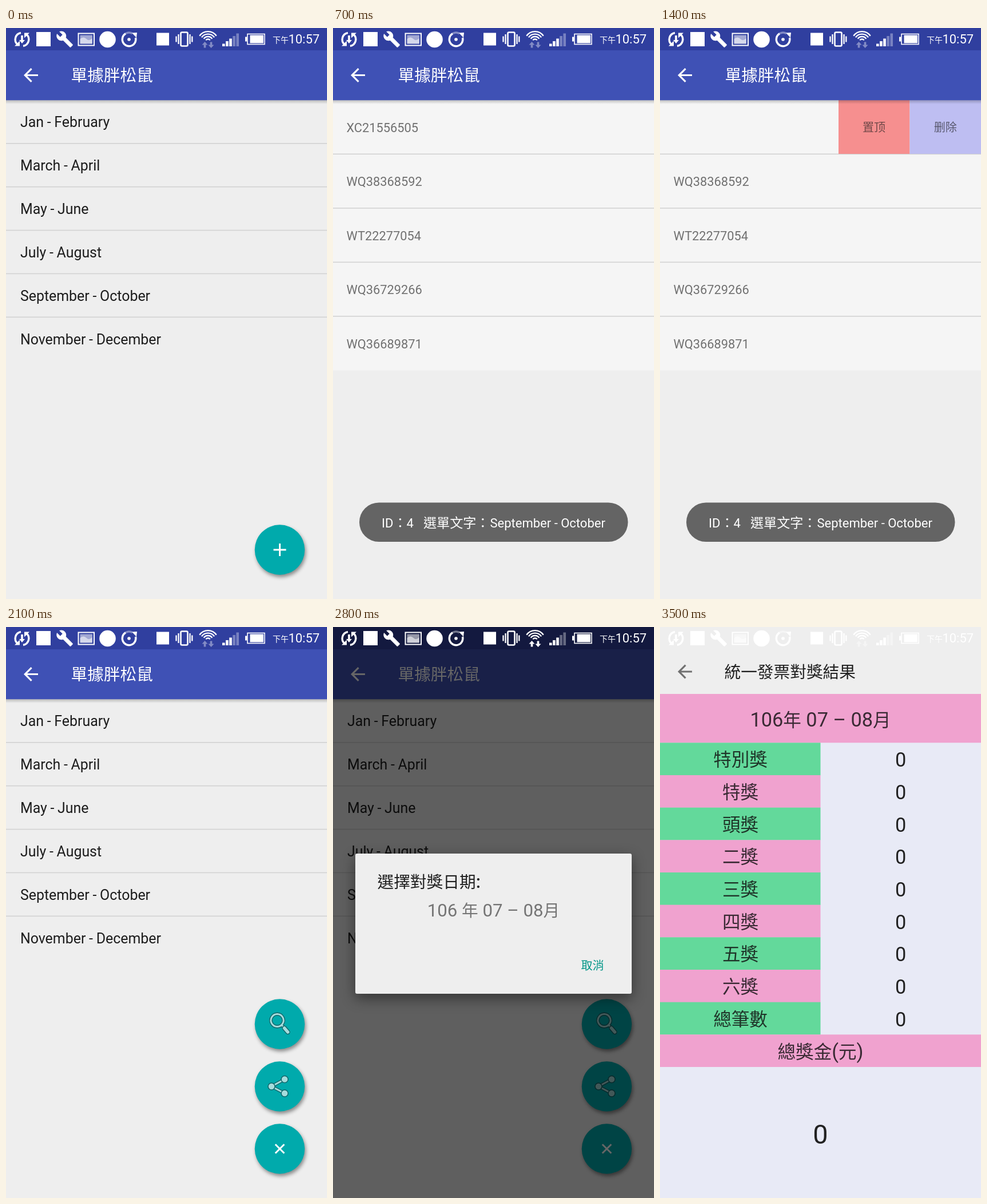
An HTML page that plays this animation: 561 by 998 pixels, repeating every 4200 ms.

```html
<!DOCTYPE html>
<html lang="zh-Hant">
<head>
<meta charset="utf-8">
<style>
  html, body { margin: 0; width: 100%; height: 100%; overflow: hidden; background: #eee; }
  svg { display: block; width: 561px; height: 998px; }
  text { font-family: Roboto, "Noto Sans CJK TC", "Noto Sans CJK JP", "Noto Sans CJK", sans-serif; white-space: pre; }
  .months { word-spacing: -.03em; }
  .fab { filter: drop-shadow(2px 4px 3px rgba(0,0,0,.42)); }
  .dialog { filter: drop-shadow(0 8px 12px rgba(0,0,0,.45)); }
</style>
</head>
<body>
<svg id="stage" viewBox="0 0 561 998"></svg>
<script>
const STEP = 700, STEPS = 6;
const CENTER = 'text-anchor="middle"', MEDIUM = 'font-weight="500"';

const rect = (x, y, w, h, fill, more = '') =>
  `<rect x="${x}" y="${y}" width="${w}" height="${h}" fill="${fill}" ${more}/>`;
const circle = (x, y, r, more = '') => `<circle cx="${x}" cy="${y}" r="${r}" ${more}/>`;
const path = (d, more = '') => `<path d="${d}" ${more}/>`;
// CJK glyphs are set slightly smaller than the Latin ones beside them
const text = (s, x, y, size, fill, more = '') =>
  `<text x="${x}" y="${y}" font-size="${size}" fill="${fill}" ${more}>` +
  s.replace(/[\u2e80-\uffff]+/g, '<tspan font-size=".92em">$&</tspan>') + '</text>';
const repeat = (n, draw) => Array.from({ length: n }, (_, i) => draw(i)).join('');
// A group visible only in the listed steps
const during = (steps, ...parts) => `<g data-on="${steps}">${parts.join('')}</g>`;

const backArrow = (y, fill) =>
  path('M20 11H7.83l5.59-5.59L12 4l-8 8 8 8 1.41-1.41L7.83 13H20v-2z',
    `fill="${fill}" transform="translate(24.8 ${y - 18.7}) scale(1.558)"`);

const months = ['Jan - February', 'March - April', 'May - June', 'July - August',
  'September - October', 'November - December'];
const monthList = '<g class="months">' +
  months.map((m, i) => text(m, 24.9, 173 + i * 75.9, 24.93, '#1d1d1d')).join('') + '</g>' +
  repeat(5, i => rect(0, 201 + i * 75.9, 561, 1.5, '#d0d0d0'));

const numbers = ['XC21556505', 'WQ38368592', 'WT22277054', 'WQ36729266', 'WQ36689871'];
const number = i => text(numbers[i], 23.4, 181.8 + i * 94.5, 21.8, '#717171');
const invoiceList = rect(0, 126, 561, 472.5, '#f5f5f5') +
  repeat(4, i => number(i + 1) + rect(0, 219.6 + i * 94.5, 561, 1.5, '#d0d0d0'));

const swipeActions = rect(312, 126, 124.5, 94, '#f68f8f') + rect(436.5, 126, 124.5, 94, '#bebef2') +
  text('置顶', 374, 181, 21.8, '#714848', CENTER) + text('删除', 498.7, 181, 21.8, '#5a5a70', CENTER);

const appBar = rect(0, 126, 561, 7, 'url(#shade)') + rect(0, 0, 561, 126.2, '#3f51b5') +
  rect(0, 0, 561, 39, '#303f9f') + backArrow(82.5, '#fff') +
  text('單據胖松鼠', 113.5, 93, 31.2, '#fff', MEDIUM);

const toast = rect(46, 829.5, 469.5, 68.5, '#646464', 'rx="34.2"') +
  text('ID', 85, 873, 22, '#fff') + text('：', 106, 873, 24.9, '#fff') + text('4', 128.5, 873, 22, '#fff') +
  text('選單文字：', 158, 873, 25.1, '#fff') + text('September - October', 274.5, 873, 22, '#fff');

const fab = y => circle(478.4, y, 43.7, 'fill="#00aaac" class="fab"');
const plus = more => path('M467.5 912h22M478.5 901v22', `stroke="#fff" stroke-width="3" ${more}`);
const outlined = (d, width = 3) =>
  path(d, `stroke="#12676b" stroke-width="${width + 2.8}"`) + path(d, `stroke="#a5dcdc" stroke-width="${width}"`);
const nodes = [[464, 803], [487, 790.5], [487, 815]];
const fabMenu = fab(694) + fab(803) +
  `<g fill="none" stroke-linecap="round">
    ${outlined('M474 676.5a11 11 0 1 0 .01 0M482 696l3 3')}
    ${outlined('M486.5 701l6 7', 5.5)}
    ${outlined('M487 790.5L464 803L487 815')}
  </g>` +
  nodes.map(([x, y]) => circle(x, y, 6, 'fill="#a5dcdc" stroke="#12676b" stroke-width="1.5"')).join('');

const dialog = rect(0, 0, 561, 998, '#000', 'opacity=".6"') +
  rect(39, 396, 483, 245, '#eee', 'rx="3" class="dialog"') +
  text('選擇對獎日期:', 77.5, 456, 31.2, '#212121', MEDIUM) +
  text('106 年 07 – 08月', 280.5, 506, 31.2, '#757575', CENTER) +
  text('取消', 453.5, 599, 21.8, '#009688', `${CENTER} ${MEDIUM}`);

const PINK = '#f0a2cf', GREEN = '#63d99b', ROW = 56.67, TOP = 202.3;
const prizes = ['特別獎', '特獎', '頭獎', '二獎', '三獎', '四獎', '五獎', '六獎', '總筆數'];
const results = rect(0, 0, 561, 998, '#e8eaf6') + rect(0, 0, 561, 117, '#eee') +
  backArrow(78, '#707070') + text('統一發票對獎結果', 112.5, 88.5, 31.2, '#212121', MEDIUM) +
  rect(0, 117, 561, TOP - 117, PINK) +
  text('106年 07 – 08月', 280.5, 173.5, 34.3, '#3a2a34', CENTER) +
  prizes.map((name, i) => {
    const y = TOP + i * ROW;
    return rect(0, y, 280.5, ROW + .3, i % 2 ? PINK : GREEN) +
      text(name, 140.5, y + 41, 34.3, i % 2 ? '#3a2a34' : '#1f3529', CENTER) +
      text('0', 420.7, y + 42, 34.3, '#212121', CENTER);
  }).join('') +
  rect(0, TOP + 9 * ROW, 561, ROW, PINK) +
  text('總獎金(元)', 280.5, 754, 34.3, '#3a2a34', CENTER) +
  text('0', 280.5, 902.5, 46.75, '#212121', CENTER);

const wifiArc = r => {
  const dx = r * .82, y = 24 - r * .57;
  return path(`M${353 - dx} ${y}A${r} ${r} 0 0 1 ${353 + dx} ${y}`);
};
const wifiArrows = path('M347.5 24l5 5.5h-3.2v5h-3.6v-5h-3.2zM358.5 35l5-5.5h-3.2v-5h-3.6v5h-3.2z', 'id="traffic"');

const statusIcons = `
  <g fill="none" stroke="#fff" stroke-width="3.4">
    ${path('M26 8.5A11.8 11.8 0 0 0 20 28.8M30 31.5A11.8 11.8 0 0 0 36 11.2')}
    ${path('M226.5 17A11.8 11.8 0 1 1 209 9.8')}
    ${path('M209 9.8A11.8 11.8 0 0 1 221 9.8', 'opacity=".4"')}
  </g>
  <g fill="#fff">
    ${path('M15 31.5h9v-9zM41 8.5h-9v9zM28 27l-5-6h3.2v-8h3.6v8h3.2z')}
    ${rect(53, 7, 25, 25, '#fff')}
    ${path('M22.7 19l-9.1-9.1c.9-2.3.4-5-1.5-6.9-2-2-5-2.4-7.4-1.3L9 6 6 9 1.6 4.7C.4 7.1.9 10.1 2.9 12.1c1.9 1.9 4.6 2.4 6.9 1.5l9.1 9.1c.4.4 1 .4 1.4 0l2.3-2.3c.5-.4.5-1.1.1-1.4z',
      'transform="translate(87 4) scale(1.3)"')}
    ${rect(126.5, 9.5, 27.5, 21, 'none', 'stroke="#fff" stroke-width="2"')}
    ${rect(129.5, 12.5, 21.5, 15, '#fff', 'opacity=".55"')}
    ${path('M129.5 19q6-5 11 0t10-1v9.5h-21z', 'opacity=".55"')}
    ${circle(177.5, 20, 14.3)}
    ${circle(215, 20, 2.8)}
    ${path('M220 8.5l9-.5-1 9z')}
    ${rect(263, 8.5, 22, 22, '#fff')}
    ${wifiArrows}
    ${repeat(5, i => rect(378 + i * 6.1, 27.5 - i * 4.5, 4.6, 4.5 + i * 4.5, '#fff', i > 2 ? 'opacity=".35"' : ''))}
    ${rect(426.5, 12.5, 23.5, 14, '#fff')}
    ${rect(418, 15.5, 3, 8, '#fff')}
  </g>
  <g fill="none" stroke="#fff" stroke-width="2.3">
    ${rect(305.5, 7.5, 12, 24, 'none', 'rx="2" stroke-width="2.6"')}
    ${path('M301.5 11v17M297.5 14.5v10M321.5 11v17M325.3 14.5v10')}
    ${repeat(4, i => wifiArc(4.5 + i * 4.5))}
    ${rect(422, 10.5, 30, 18, 'none', 'stroke-width="1.6"')}
  </g>` +
  text('下午', 466, 26, 15.2, '#fff') + text('10:57', 493.5, 27.3, 21.9, '#fff');

const stage = document.getElementById('stage');
stage.innerHTML = `
  <defs><linearGradient id="shade" x2="0" y2="1">
    <stop stop-color="#000" stop-opacity=".22"/><stop offset="1" stop-color="#000" stop-opacity="0"/>
  </linearGradient></defs>` +
  rect(0, 0, 561, 998, '#eee') +
  during('034', monthList) +
  during('12', invoiceList) +
  during('1', number(0)) +
  during('2', swipeActions) +
  during('01234', appBar) +
  during('12', toast) +
  during('034', fab(912)) +
  during('0', plus('')) +
  during('34', fabMenu, plus('transform="rotate(45 478.5 912)"')) +
  during('4', dialog) +
  during('5', results) +
  statusIcons;

const groups = stage.querySelectorAll('[data-on]');
const traffic = document.getElementById('traffic');

function render() {
  const step = Math.floor(performance.now() / STEP) % STEPS;
  for (const g of groups) g.style.display = g.dataset.on.includes(step) ? '' : 'none';
  traffic.style.opacity = step === 4 ? 1 : .4;
  requestAnimationFrame(render);
}
render();
</script>
</body>
</html>
```
